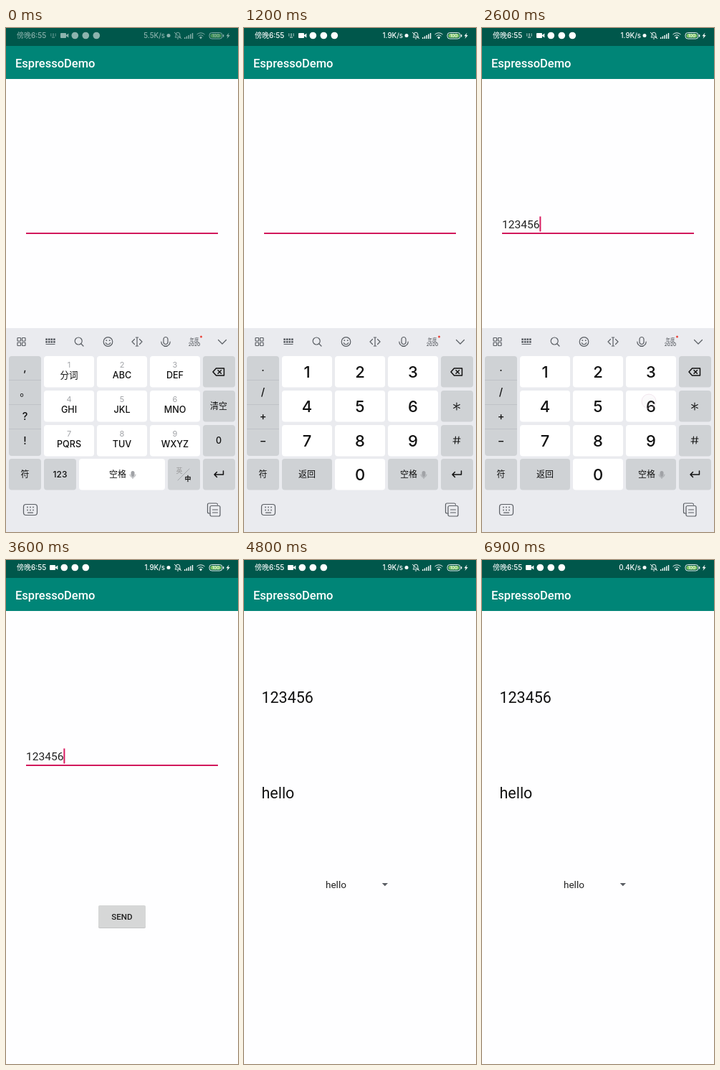
Write an HTML page that moves like this. It is 324x702 px and loops after 7100 ms.

```html
<!DOCTYPE html>
<html lang="zh">
<head>
<meta charset="utf-8">
<title>EspressoDemo</title>
<style>
html, body { margin: 0; width: 100%; height: 100%; overflow: hidden; background: #fefeff; }
svg { display: block; width: 100%; height: 100%; }
text { font-family: Roboto, sans-serif; fill: #212121; }
.title { font-size: 16.5px; font-weight: 500; fill: #fff; }
.field { font-size: 15.55px; }
.big { font-size: 21.45px; fill: #111; }
.item { font-size: 13.5px; }
.send { font-size: 11.6px; font-weight: 500; text-anchor: middle; }
#keyboard text { font-family: Inter, "Noto Sans CJK SC", "Noto Sans CJK", sans-serif; font-weight: 500; text-anchor: middle; fill: #111; }
#keyboard .hint { font-size: 11px; font-weight: 400; fill: #a2a4a8; }
#keyboard .letters { font-size: 12.6px; }
#keyboard .digit { font-size: 22px; }
#keyboard .label { font-size: 12px; }
#keyboard .sign { font-size: 14.5px; }
#keyboard .mode { font-size: 9px; fill: #999; }
#keyboard .active { font-weight: 700; fill: #111; }
#keyboard .tiny { font-size: 6.5px; fill: #50545a; }
.icon { fill: none; stroke: #5a5e64; stroke-width: 1.2; stroke-linecap: round; stroke-linejoin: round; }
.dark { stroke: #111; stroke-width: 1.5; }
.thin { stroke: #111; stroke-width: 1.1; }
.pale { stroke: #a0a2a6; stroke-width: .9; }
.solid { fill: #5a5e64; stroke: none; }
#status { fill: none; stroke: #fff; stroke-width: .9; stroke-linejoin: round; }
#status text { font: 500 10px Inter, "Noto Sans CJK SC", "Noto Sans CJK", sans-serif; fill: #fff; stroke: none; }
#status .speed { font-size: 9.7px; text-anchor: end; }
#status .level { font-size: 6px; text-anchor: middle; }
#status .fill { fill: #fff; stroke: none; }
#popup { filter: drop-shadow(0 7px 7px rgba(0, 0, 0, .32)); }
</style>
</head>
<body>
<svg id="stage" viewBox="0 0 324 702" preserveAspectRatio="none"></svg>
<script>
const LOOP = 7100;
const css = [];

// Each stop is [ms, declarations]; holds until the next stop unless it sets an easing.
function animate(selector, stops) {
  const name = 'a' + css.length;
  const all = [...stops, [LOOP, stops[stops.length - 1][1]]];
  const frames = all.map(([ms, rule]) => `${ms / LOOP * 100}%{${rule}}`).join('');
  css.push(`@keyframes ${name}{${frames}}${selector}{animation:${name} ${LOOP}ms step-end infinite}`);
}
const show = (selector, from, to = LOOP) => animate(selector, [
  [0, `opacity:${from ? 0 : 1}`],
  ...(from ? [[from, 'opacity:1']] : []),
  ...(to < LOOP ? [[to, 'opacity:0']] : [])
]);
const move = (x, y = 0) => `transform:translate(${x}px,${y}px)`;
const ease = 'animation-timing-function:cubic-bezier(.2,.6,.3,1);';
const linear = 'animation-timing-function:linear;';

const text = (x, y, cls, s) => `<text x="${x}" y="${y}" class="${cls}">${s}</text>`;
const rect = (x, y, w, h, fill, r = 0) =>
  `<rect x="${x}" y="${y}" width="${w}" height="${h}" rx="${r}" fill="${fill}" stroke="none"/>`;
const frame = (x, y, w, h, r) => `<rect x="${x}" y="${y}" width="${w}" height="${h}" rx="${r}"/>`;
const path = (d, cls = '') => `<path class="${cls}" d="${d}"/>`;
const circle = (x, y, r, cls = '') => `<circle class="${cls}" cx="${x}" cy="${y}" r="${r}"/>`;
const icon = (x, y, body, cls = '') => `<g class="icon ${cls}" transform="translate(${x} ${y})">${body}</g>`;
const group = (id, body) => `<g id="${id}">${body}</g>`;

const page = (id, body) => group(id,
  rect(0, 0, 324, 702, '#fefeff') + rect(0, 0, 324, 25, '#00574b') +
  rect(0, 25, 324, 46, '#008577') + text(13, 55, 'title', 'EspressoDemo') + body);

// Keyboard
const WHITE = '#fff', GRAY = '#cfd2d5';
const colX = [53, 127, 201], rowY = [457, 505, 553, 600];
const key = (x, y, w, fill) => rect(x, y, w, 43.5, fill, 4);
const label = (x, y, s) => text(x, y, 'label', s);
const grid = draw => Array.from({length: 9}, (_, i) => {
  const x = colX[i % 3], y = rowY[i / 3 | 0];
  return key(x, y, 70, WHITE) + draw(i, x + 35, y);
}).join('');
const sideColumn = signs => rect(4, 457, 45, 139, GRAY, 4) +
  [490, 524, 558].map(y => rect(4, y, 45, 1, '#bfc2c7')).join('') +
  [...signs].map((s, i) => text(26.5, 477.5 + i * 34, 'sign', s)).join('');
const spaceMic = (x, y) => icon(x, y,
  rect(-2.5, -5, 5, 8, '#a0a2a6', 2.5) + path('M-4 0a4 4 0 0 0 8 0M0 4v1.5'), 'pale');

const words = ['分词', 'ABC', 'DEF', 'GHI', 'JKL', 'MNO', 'PQRS', 'TUV', 'WXYZ'];
const lettersPad = sideColumn(',。?!') +
  grid((i, x, y) => text(x, y + 15.5, 'hint', i + 1) + text(x, y + 31, 'letters', words[i])) +
  key(275, 505, 45, GRAY) + label(297, 531, '清空') +
  key(275, 553, 45, GRAY) + text(297, 578.5, 'letters', '0') +
  key(53, 600, 45, GRAY) + label(75.5, 626, '123') +
  key(102, 600, 120, WHITE) + label(156, 626, '空格') + spaceMic(177, 622) +
  key(226, 600, 45, GRAY) + text(242, 620, 'mode', '英') +
  icon(248, 622, path('M-8 8L8-8'), 'pale') + text(254, 631, 'mode active', '中');

const numbersPad = sideColumn('./+−') +
  grid((i, x, y) => text(x, y + 29.5, 'digit', i + 1)) +
  key(275, 505, 45, GRAY) + icon(297, 527, path('M0-5V5M-4.3-2.5L4.3 2.5M-4.3 2.5L4.3-2.5'), 'thin') +
  key(275, 553, 45, GRAY) + icon(297, 574, path('M-1.5-5L-2.5 5M3-5L2 5M-4.5-2H5M-5 2H4.5'), 'thin') +
  key(53, 600, 70, GRAY) + label(88, 626, '返回') +
  key(127, 600, 70, WHITE) + text(162, 629.5, 'digit', '0') +
  key(201, 600, 70, GRAY) + label(230, 626, '空格') + spaceMic(251, 622);

const dots = (rows, cols, step, size) => Array.from({length: rows * cols}, (_, i) => rect(
  (i % cols - (cols - 1) / 2) * step - size / 2,
  ((i / cols | 0) - (rows - 1) / 2) * step - size / 2, size, size, '#5a5e64')).join('');
const toolbar =
  icon(21.5, 437, [-5.5, 1].map(x => [-5.5, 1].map(y => frame(x, y, 4.5, 4.5, .7)).join('')).join('')) +
  icon(62, 435.5, dots(2, 4, 3.6, 2.6) + path('M-6 5H6')) +
  icon(102, 437, circle(-.8, -1, 5) + path('M3 3L6 6')) +
  icon(142.5, 437, circle(0, 0, 6.3) + path('M-3.2 1.5a3.4 3.4 0 0 0 6.4 0') +
    circle(-2.2, -1.8, .9, 'solid') + circle(2.2, -1.8, .9, 'solid')) +
  icon(183, 437, path('M-3.5-3.5L-7 0L-3.5 3.5M3.5-3.5L7 0L3.5 3.5M0-5.5V5.5M-1.7-6H1.7M-1.7 6H1.7')) +
  icon(223, 437, frame(-3, -6.5, 6, 10, 3) + path('M-6.2 0a6.2 6.2 0 0 0 12.4 0M-2 6.5H2')) +
  text(263, 437, 'tiny', '年度') + text(263, 443, 'tiny', '2020') +
  rect(271, 428.5, 3, 3, '#e9453c', 1.5) +
  icon(302, 437, path('M-5.5-2.5L0 3L5.5-2.5'));

const keyboard = group('keyboard', rect(0, 418, 324, 284, '#eaebef') + toolbar +
  group('letters', lettersPad) + group('numbers', numbersPad) +
  key(275, 457, 45, GRAY) +
  icon(297, 479, path('M-8 0L-3.5-5H7.5V5H-3.5ZM-1-2.2L3.5 2.2M-1 2.2L3.5-2.2'), 'dark') +
  key(4, 600, 45, GRAY) + label(26.5, 626, '符') +
  key(275, 600, 45, GRAY) +
  icon(297, 622, path('M6.5-5V0H-6M-2.5-3.5L-6 0L-2.5 3.5'), 'dark') +
  icon(34, 671, frame(-9.5, -7.5, 19, 15, 3.5) +
    `<g transform="translate(0 -1.5)">${dots(2, 3, 4, 1.6)}</g>` + path('M-3.5 4.2H3.5')) +
  icon(290, 671, path('M-5 5H-6.5a2 2 0 0 1-2-2V-7a2 2 0 0 1 2-2H3.5a2 2 0 0 1 2 2') +
    frame(-5, -5.5, 14, 14.5, 2) + path('M-1.5 0H5.5M-1.5 4H5.5')));

// Pages
const formPage = page('form',
  text(28, 279, 'field', '123456') +
  group('typing', rect(28, 260, 60, 24, '#fefeff') + group('caret', rect(28, 262.5, 2, 21, '#d81b60'))) +
  rect(28, 285, 268, 2, '#d2195c') +
  rect(129, 482, 66, 31, '#c4c5c6', 2) + rect(129, 481, 66, 31, '#d6d7d7', 2) +
  text(162, 500.5, 'send', 'SEND') + keyboard);

const resultPage = page('result',
  text(24.5, 199, 'big', '123456') + text(24.5, 331.5, 'big', 'hello') +
  text(114, 457, 'item', 'hello') + path('M192.7 450H201L196.8 454.2Z', 'solid') +
  group('popup', rect(108, 441, 69, 56, '#fff', 1) +
    ['hello', 'hi', 'whats up'].map((s, i) => text(114, 456.5 + i * 18.6, 'item', s)).join('')));

// Status bar
const bars = [0, 1, 2, 3, 4].map(i => rect(249 + i * 2.7, 13 - i * 1.5, 1.4, 2 + i * 1.5, '#fff')).join('');
const badge = x => circle(x, 10.5, 4.8, 'fill');
const status = group('status',
  text(15, 14.3, '', '傍晚6:55') +
  group('imeIcon', path('M62 8.5H63.5M65 8.5H67M68.5 8.5H70M62 10.7H63.5M65 10.7H67M68.5 10.7H70M64 13H68')) +
  group('notices', rect(76, 7, 8, 7, '#fff', 1) + path('M84 10L87.3 7.5V13.5L84 11Z', 'fill') +
    badge(96.3) + badge(111.3) + badge(126.3)) +
  group('speedA', text(222, 14, 'speed', '5.5K/s')) +
  group('speedB', text(222, 14, 'speed', '1.9K/s')) +
  group('speedC', text(222, 14, 'speed', '0.4K/s')) +
  circle(227, 10.5, 2.5, 'fill') +
  path('M236 13H244L242.8 11.3V9a2.8 2.8 0 0 0-5.6 0V11.3ZM239 15H241M235 6L245 15') + bars +
  path('M266.5 9a8 8 0 0 1 11 0M268.5 11.3a5 5 0 0 1 7 0') +
  path('M270 13L272 15.5L274 13A3 3 0 0 0 270 13Z', 'fill') +
  frame(284, 6.5, 18, 8.5, 3.5) + rect(285.5, 8, 15, 5.5, '#7cc463', 2.3) + rect(303, 9, 1.3, 3.5, '#fff', .6) +
  text(293, 13, 'level', '100') +
  path('M311.5 6.5L307.5 11.3H309.7L308.5 15L312.7 10H310.3Z', 'fill'));

const touch = group('touch',
  '<circle r="10" fill="#c8bec8" fill-opacity=".07" stroke="#e8cfe0" stroke-opacity=".5"/>');

document.getElementById('stage').innerHTML = formPage + resultPage + status + touch;

// Timeline
const typeTimes = [1400, 1620, 1840, 2060, 2280, 2500];
animate('#typing', [[0, move(0)], ...typeTimes.map((ms, i) => [ms, move((i + 1) * 8.73)])]);
animate('#caret', [[0, 'opacity:0'], [300, 'opacity:1'], [800, 'opacity:0'], [1300, 'opacity:1'],
  [3000, 'opacity:0'], [3500, 'opacity:1'], [4000, 'opacity:0']]);

const away = move(-40, -40);
const keyTaps = typeTimes.map((ms, i) => [ms - 100, move(colX[i % 3] + 32, rowY[i / 3 | 0] + 15)]);
animate('#touch', [[0, away], [700, move(75, 622)], [900, away], ...keyTaps, [2700, away],
  [4000, move(162, 497)], [4200, away], [5000, move(150, 452)], [5200, away],
  [6300, move(132, 452)], [6500, away]]);

show('#letters', 0, 900);
show('#numbers', 900);
animate('#keyboard', [[0, move(0)], [3000, ease + move(0)], [3300, move(0, 290)]]);
show('#imeIcon', 0, 3100);
animate('#notices', [[0, move(0)], [3100, move(-15)]]);
animate('#status', [[0, 'opacity:.55'], [100, 'opacity:1']]);
show('#speedA', 0, 1100);
show('#speedB', 1100, 5100);
show('#speedC', 5100);

animate('#form', [[0, move(0)], [4250, ease + move(0)], [4650, move(-80)]]);
animate('#result', [[0, move(324)], [4250, ease + move(324)], [4650, move(0)]]);
animate('#popup', [[0, 'opacity:0'], [5200, linear + 'opacity:0'], [5400, 'opacity:1'],
  [6450, linear + 'opacity:1'], [6650, 'opacity:0']]);

const style = document.createElement('style');
style.textContent = css.join('\n');
document.head.append(style);
</script>
</body>
</html>
```
